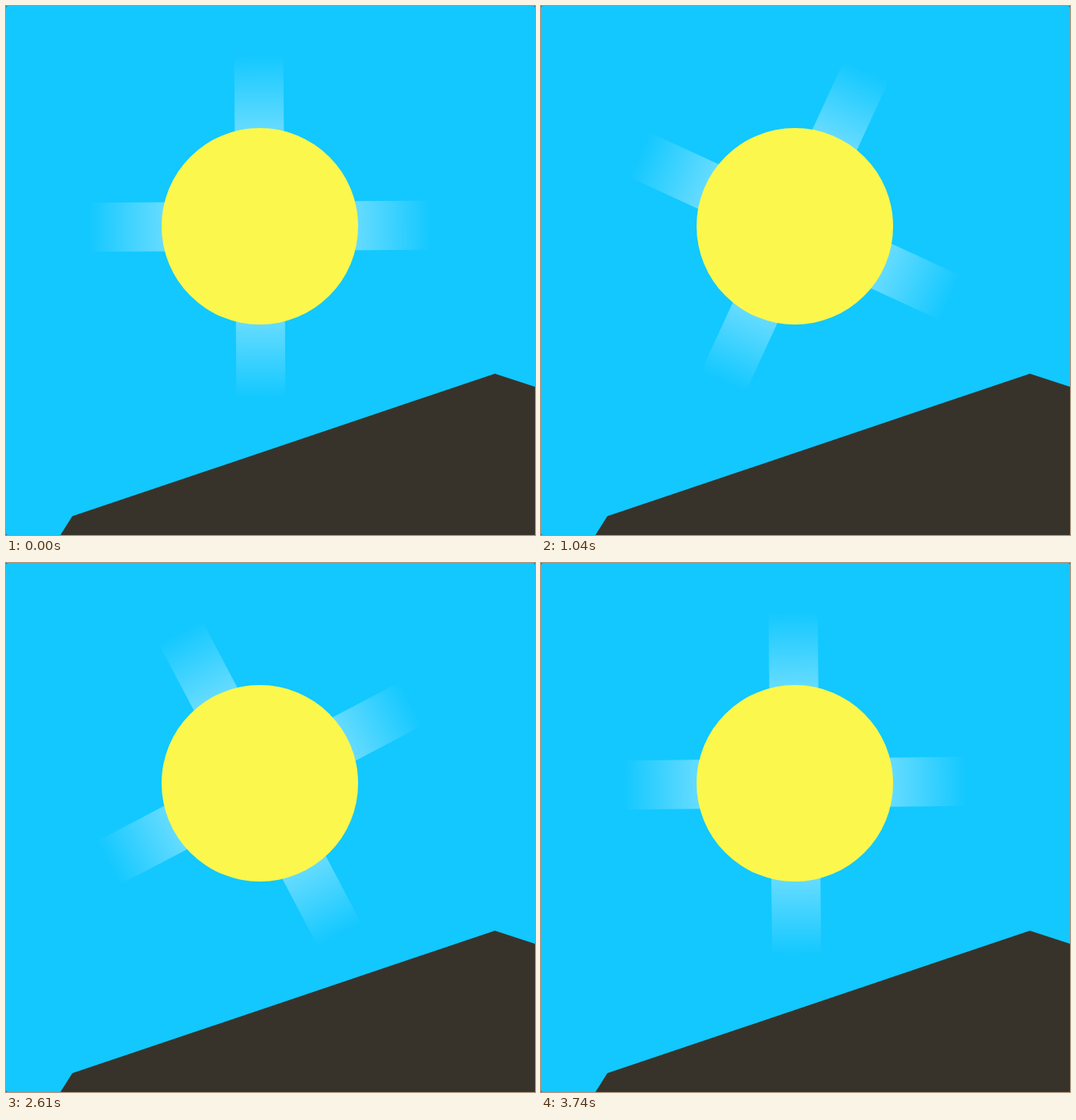
Animation, 646 px wide and 646 px high, one loop 3780 ms. Source, as an HTML page:

```html
<!DOCTYPE html>
<html lang="en">
<head>
<meta charset="utf-8">
<title>Sun over a roof</title>
<style>
  html, body { margin: 0; width: 100%; height: 100%; overflow: hidden; background: #38332a; }
  svg { display: block; width: 646px; height: 646px; }
</style>
</head>
<body>
<svg viewBox="0 0 646 646">
  <defs>
    <linearGradient id="glow" x1="0" y1="0" x2="0" y2="1">
      <stop offset="0" stop-color="#fff" stop-opacity="0"/>
      <stop offset=".5" stop-color="#fff" stop-opacity=".8"/>
      <stop offset="1" stop-color="#fff" stop-opacity="0"/>
    </linearGradient>
  </defs>
  <rect width="646" height="646" rx="2" fill="#12c8ff"/>
  <g transform="translate(310 269)">
    <g id="rays" fill="url(#glow)">
      <rect x="-30" y="-210" width="60" height="420"/>
      <rect x="-30" y="-210" width="60" height="420" transform="rotate(90)"/>
    </g>
    <circle r="120" fill="#fbf74c"/>
  </g>
  <path d="M66.5 646 81 623 597 449 646 465V646Z" fill="#38332a"/>
</svg>
<script>
  const LOOP = 3780, FPS = 23, STEPS = 87;
  const START_ANGLE = -0.35, DEG_PER_SECOND = 24;
  const rays = document.getElementById('rays');

  // Steps begin on the nearest 10 ms.
  const stepStart = i => Math.round(i * 100 / FPS) * 10;

  function stepAt(ms) {
    let i = Math.min(STEPS - 1, Math.ceil(ms * FPS / 1000) + 1);
    while (i > 0 && stepStart(i) > ms) i--;
    return i;
  }

  function draw(now) {
    const angle = START_ANGLE + stepAt(now % LOOP) * DEG_PER_SECOND / FPS;
    rays.setAttribute('transform', `rotate(${angle.toFixed(3)})`);
  }

  let origin;
  function tick() {
    const now = performance.now();
    origin ??= now;
    draw(now - origin);
    requestAnimationFrame(tick);
  }
  draw(0);
  requestAnimationFrame(tick);
</script>
</body>
</html>
```
